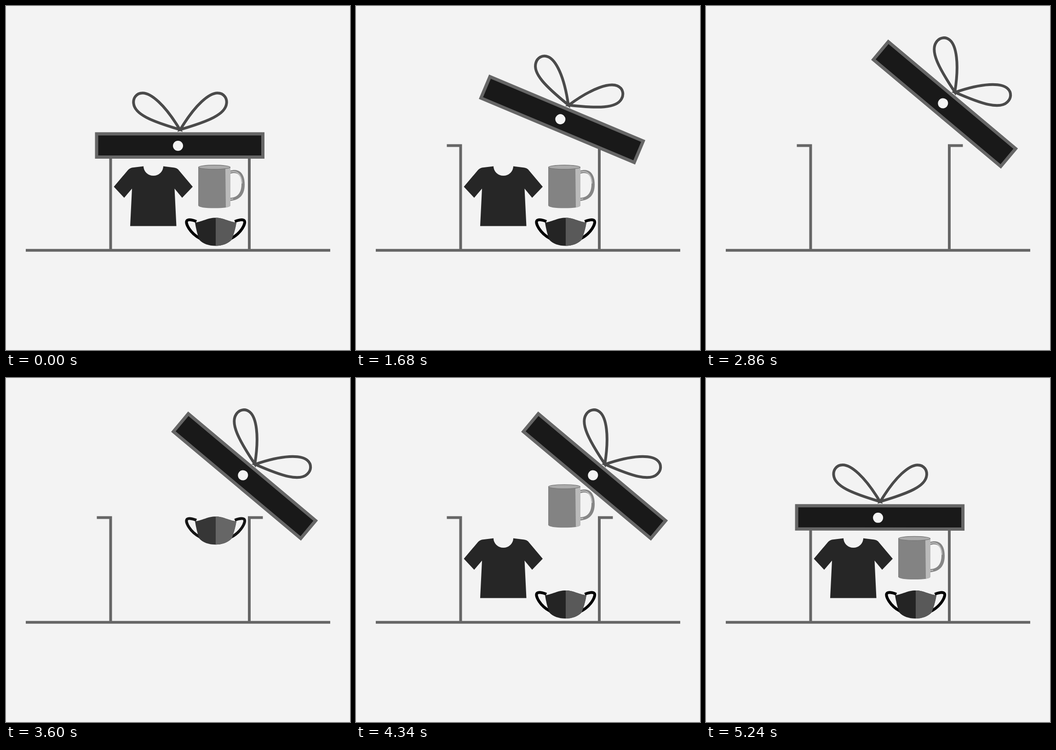
Write an HTML page that moves like this. It is 748 px wide and 748 px high and loops after 6000 ms.

```html
<!DOCTYPE html>
<html lang="en">
<head>
<meta charset="utf-8">
<title>Gift box</title>
<style>
  html, body { margin: 0; width: 100%; height: 100%; overflow: hidden; background: #f3f3f3; }
  svg { display: block; width: 100%; height: 100%; }
</style>
</head>
<body>
<svg viewBox="0 0 748 748" fill="none">
  <defs>
    <clipPath id="aboveFloor"><rect width="748" height="528"/></clipPath>
    <clipPath id="rightHalf"><rect x="456" y="450" width="60" height="80"/></clipPath>
    <path id="maskBody" d="M411 471C430 468 438 460.5 455.5 460.5C473 460.5 481 468 501 471C499 484 495 496 491 508C482 517 470 521.5 455.5 521.5C441 521.5 428 517 420 508C416 496 413 484 411 471Z"/>
    <path id="strap" d="M414 468.5C404 464.5 396 464 393.5 466.5C389 472 400 494 422 505.5" stroke="#000" stroke-width="6"/>
    <path id="loop" d="M378 268.7C345 213.5 315 189.2 297 189.2C283 189.2 276 201 277.5 212C280 235.5 316 250.5 378 268.7Z" stroke="#4a4a4a" stroke-width="6"/>
  </defs>

  <g clip-path="url(#aboveFloor)">
    <g id="mask">
      <use href="#strap"/>
      <use href="#strap" transform="translate(911.5) scale(-1 1)"/>
      <use href="#maskBody" fill="#242424"/>
      <use href="#maskBody" fill="#595959" clip-path="url(#rightHalf)"/>
    </g>
    <path id="shirt" fill="#262626" d="M299 348.5A21.5 20.5 0 0 0 342 348.5L366 351.5Q371 352 374 355L406 393L383 417L366.5 397L370.5 478.5H270L274 397L257 417L234.5 393L265 357Q268 353 274 351.5Z"/>
    <g id="mug">
      <path d="M487 358C507 352 519 364 519 388C519 410 509 422 487 424V417C503 417 512 406 512 388C512 369 505 359 487 365Z" fill="#868686"/>
      <path d="M487 361.5C505 355 513 371 513 386M487 420.5L494 419.5" stroke="#c4c4c4" stroke-width="2"/>
      <path d="M418 351H488V434Q485 439.5 453 439.5Q421 439.5 418 434Z" fill="#838383"/>
      <path d="M477 353L488 351V434Q486 437 478 438Z" fill="#bababa"/>
      <ellipse cx="453" cy="350.5" rx="34.5" ry="4.5" fill="#ababab" stroke="#777" stroke-width="1.3"/>
    </g>
  </g>

  <path d="M43 531.2H705M197.5 303.5H227.5V531M558.5 303.5H529V531" stroke="#666" stroke-width="6"/>

  <g id="lid">
    <use href="#loop"/>
    <use href="#loop" transform="translate(757) scale(-1 1)"/>
    <rect x="197" y="278" width="361.5" height="50.5" fill="#191919" stroke="#666" stroke-width="7"/>
    <circle cx="374" cy="304" r="11" fill="#f3f3f3"/>
  </g>
</svg>
<script>
const LOOP = 6000;
const LID = { closed: [377.75, 303.5], bend: [428, 248], open: [518.5, 213.5], tilt: 40 };
// Items leave and return in this order; rest is where each settles after its return.
const items = [["mask", 1.5], ["shirt", 0], ["mug", -1.5]]
  .map(([id, rest]) => ({ node: document.getElementById(id), rest }));
const lid = document.getElementById("lid");

const clamp = u => Math.min(1, Math.max(0, u));
const progress = (t, start, length) => clamp((t - start) / length);
const sine = u => (1 - Math.cos(Math.PI * u)) / 2;
const cubic = u => u < 0.5 ? 4 * u ** 3 : 1 - 4 * (1 - u) ** 3;

function drawItem({ node, rest }, t, i) {
  const back = 3510 + 300 * i;
  const returning = t >= back;
  const y = returning
    ? rest - 164 * (1 - cubic(progress(t, back, 540)))
    : 183 * cubic(progress(t, 1900 + 240 * i, 480));
  node.setAttribute("transform", `translate(0 ${y})`);
  node.setAttribute("opacity", returning ? progress(t, back, 100) : 1);
}

function drawLid(t) {
  const p = sine(progress(t, 1300, 700)) - sine(progress(t, 4556, 700));
  const q = 1 - p;
  const [x, y] = LID.closed.map((a, k) => q * q * a + 2 * p * q * LID.bend[k] + p * p * LID.open[k]);
  const [cx, cy] = LID.closed;
  lid.setAttribute("transform", `translate(${x} ${y}) rotate(${LID.tilt * p}) translate(${-cx} ${-cy})`);
}

const begin = performance.now();
function frame() {
  const t = (performance.now() - begin) % LOOP;
  items.forEach((item, i) => drawItem(item, t, i));
  drawLid(t);
  requestAnimationFrame(frame);
}
frame();
</script>
</body>
</html>
```
